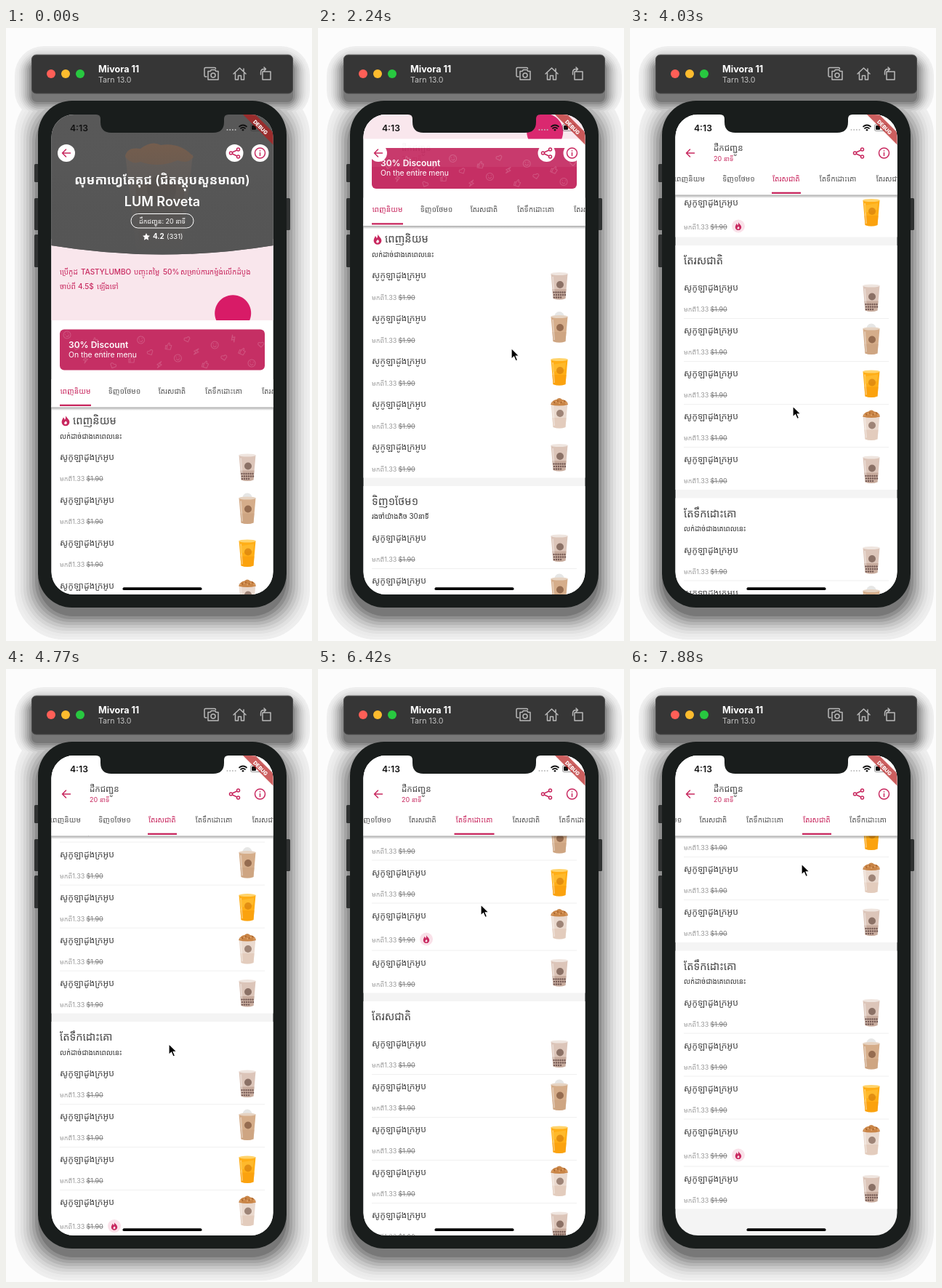
Write an HTML page that moves like this. It is 421x843 px and loops after 8 s.

```html
<!DOCTYPE html>
<html lang="km">
<head>
<meta charset="utf-8">
<title>Menu scroll</title>
<style>
html,body{margin:0;width:100%;height:100%;overflow:hidden;background:#fcfcfc}
svg{display:block;width:100%;height:100%}
text{font-family:Inter,"Noto Sans Khmer","Noto Sans",sans-serif}
.line{fill:none;stroke-linecap:round;stroke-linejoin:round}
</style>
</head>
<body>
<svg id="stage" viewBox="0 0 421 843"></svg>
<script>
const PINK = '#c8285f', LEFT = 74, BAR = 292, LOOP = 8000;
const stage = document.getElementById('stage');
const $ = id => document.getElementById(id);
const clamp = (v, a, b) => Math.max(a, Math.min(b, v));
const lerp = (a, b, k) => a + (b - a) * k;

const text = (x, y, size, fill, str, extra = '') =>
  `<text x="${x}" y="${y}" font-size="${size}" fill="${fill}" ${extra}>${str}</text>`;
const rect = (x, y, w, h, fill, r = 0, extra = '') =>
  `<rect x="${x}" y="${y}" width="${w}" height="${h}" rx="${r}" fill="${fill}" ${extra}/>`;
const circle = (x, y, r, fill, extra = '') =>
  `<circle cx="${x}" cy="${y}" r="${r}" fill="${fill}" ${extra}/>`;
const path = (d, fill, extra = '') => `<path d="${d}" fill="${fill}" ${extra}/>`;
const line = (d, stroke, w, extra = '') =>
  `<path class="line" d="${d}" stroke="${stroke}" stroke-width="${w}" ${extra}/>`;
const at = (x, y, body, scale = 1) => `<g transform="translate(${x} ${y}) scale(${scale})">${body}</g>`;

const POPULAR = 'ពេញនិយម', DEAL = 'ទិញ១ថែម១', FRESH = 'តែរសជាតិ', MILK = 'តែទឹកដោះគោ';
const BEST = 'លក់ដាច់ជាងគេពេលនេះ';
const tabs = [
  { name: POPULAR, x: 74, w: 43 }, { name: DEAL, x: 141, w: 44 },
  { name: FRESH, x: 208.5, w: 40 }, { name: MILK, x: 272, w: 55 },
  { name: FRESH, x: 351, w: 40 }, { name: MILK, x: 414, w: 55 }
];
const sections = [
  { sub: BEST, n: 5 }, { sub: 'រងចាំយ៉ាងតិច 30នាទី', n: 3, hot: 2 }, { n: 5 },
  { sub: BEST, n: 5, hot: 3 }, { n: 5 }, { sub: BEST, n: 5, hot: 3 }
];

const flame = (hole = '#fff') =>
  path('M0-7C1-4 5.4-2 5.4 2A5.4 5.2 0 0 1-5.4 2C-5.4-1-3.5-2.4-3.2-4.4C-2-3.5-1.4-2-1.2-1C0-2.5.4-5 0-7Z', PINK) +
  path('M.4.5C2.6 2.4 2.2 5-.2 5S-2.4 2.2.4.5Z', hole);

// Drink cups, centred on x, y = 0 at the middle of the cup
const cupStyles = [
  { body: '#dcc5b9', foot: '#b79787', rim: '#efe5df', mark: '#70564b' },
  { body: '#d5ad8a', foot: '#c89f7d', rim: '#e6d3c2', mark: '#80573c' },
  { body: '#ffae16', foot: '#f79a08', rim: '#ffd36b', mark: '#d9820c' },
  { body: '#ead9ce', foot: '#dfc3b0', rim: '#e9d8c9', mark: '#85695a' }
];
function cup(kind) {
  const c = cupStyles[kind];
  let s = '';
  if (kind === 1) s += path('M-7-15A7 8 0 0 1 7-15Z', '#e6e6e5');
  s += path('M-11.5-16H11.5L8.5 18Q0 21-8.5 18Z', c.body) +
    path('M-9.6 5H9.6L8.5 18Q0 21-8.5 18Z', c.foot, 'opacity=".55"') +
    path('M-9-12L-7 16', 'none', 'stroke="#fff" stroke-opacity=".35" stroke-width="2"') +
    `<ellipse cy="-16" rx="11.8" ry="2" fill="${c.rim}"/>`;
  if (kind === 0)
    for (let i = 0; i < 16; i++)
      s += circle(-7.5 + (i % 6) * 3 + (i > 5 ? .5 : 0), 9.5 + Math.floor(i / 6) * 3.5, 1.2, '#765b55');
  if (kind === 2) s += path('M-10-9L9-12L8-3L-9 1Z', '#ffc23a', 'opacity=".6"');
  if (kind === 3) {
    s += path('M-12-13Q-9-20-4-20Q0-24 4-20Q10-20 12-13Q0-10-12-13Z', '#c98547');
    for (let i = 0; i < 9; i++) s += circle(-9 + i * 2.3, -15 - (i * 5 % 4), 1, i % 2 ? '#a8622c' : '#e2a76c');
  }
  return s + circle(1, -1, 5, c.mark, 'opacity=".75"');
}

function item(y, kind, hot, ruled) {
  const py = y + (hot ? 37 : 33.3);
  return text(LEFT, y + 4, 12.2, '#444', 'សូកូឡាដូងក្រអូប') +
    text(LEFT, py, 9, '#999', 'មកពី1.33') +
    text(110.5, py, 9, '#777', '$1.90', 'text-decoration="line-through"') +
    (hot ? circle(149, y + 33, 9, '#f9e1e9') + at(149, y + 33, flame('#f9e1e9'), .78) : '') +
    at(332, y + 13.5, cup(kind)) +
    (ruled ? rect(LEFT, y + (hot ? 48 : 42), 282, 1, '#f0f0f0') : '');
}

function buildSections() {
  let y = 519, out = '';
  sections.forEach((sec, i) => {
    sec.top = y;
    let iy = y + (sec.sub ? 71 : 58), body = '';
    for (let k = 0; k < sec.n; k++) {
      const hot = k === sec.hot;
      body += item(iy, k % 4, hot, i > 0 && k < sec.n - 1);
      iy += hot ? 65 : 59;
    }
    sec.end = iy - 17;
    out += rect(62, y, 306, sec.end - y, '#fff') +
      (i ? '' : at(82, y + 21, flame())) +
      text(i ? LEFT : 92, y + 26, 14.6, '#444', tabs[i].name) +
      (sec.sub ? text(LEFT, y + 45.5, 9.8, '#333', sec.sub) : '') + body;
    y = sec.end + 11.5;
  });
  return out;
}

function doodles() {
  const kinds = [
    '<circle r="5"/><path d="M-2 1Q0 4 2 1M-2-2v.5M2-2v.5"/>',
    '<path d="M0 4L-4 0Q-4-4 0-2Q4-4 4 0Z"/>',
    '<path d="M1-5L-3 1H0L-1 5L3-1H0Z"/>',
    '<path d="M-4 0h2v5h-2zM-2 0L0-4Q2-4 1-1H4L3 5H-2"/>'
  ];
  let s = '';
  for (let i = 0; i < 22; i++) {
    const x = 84 + (i * 12.7) % 268, y = 422 + (i * 17) % 43;
    s += `<g transform="translate(${x} ${y}) rotate(${i * 47 % 60 - 30})">${kinds[i % 4]}</g>`;
  }
  return `<g class="line" stroke="#fff" stroke-width="1.1" opacity=".17">${s}</g>`;
}

function hero() {
  const mid = 'text-anchor="middle" font-weight="600"';
  return rect(62, 290, 306, 232, '#fff') + rect(62, 290, 306, 112, '#f9e6ec') +
    `<g clip-path="url(#hero)">` + rect(62, 60, 306, 260, '#585858') +
    path('M164 174H257L243 304H179Z', '#77685e', 'opacity=".65"') +
    path('M178 215H246L240 304H184Z', '#604d40', 'opacity=".6"') +
    path('M164 177Q166 163 185 166Q200 154 213 161Q240 157 258 177Q251 188 236 182Q210 193 185 184Q173 189 164 177Z', '#80604a') +
    circle(214, 222, 20, '#493e38', 'opacity=".55"') +
    rect(62, 119, 306, 195, 'url(#dim)') + '</g>' +
    text(215, 214.5, 17, '#fff', 'លុមកាហ្វេតែគុជ (ជិតស្តុបសួនមាលា)', mid) +
    text(215, 244.5, 18, '#fff', 'LUM Roveta', mid) +
    rect(172, 255.5, 86, 19.5, 'none', 9.7, 'stroke="#fff"') +
    text(215, 268.5, 9, '#fff', 'ដឹកជញ្ជូន: 20 នាទី', 'text-anchor="middle"') +
    path('M193 282l1.5 3.3 3.5.4-2.6 2.4.7 3.6-3.1-1.8-3.1 1.8.7-3.6-2.6-2.4 3.5-.4Z', '#fff') +
    text(202, 290.3, 9.8, '#fff', '4.2', 'font-weight="700"') + text(221, 290.3, 9.5, '#fff', '(331)') +
    `<g font-weight="500">` +
    [[74, 'ប្រើកូដ'], [103, 'TASTYLUMBO'], [176, 'បញ្ចុះតម្លៃ'], [216, '50%'], [240, 'សម្រាប់ការកម្ម៉ង់លើកដំបូង']]
      .map(([x, s]) => text(x, 338.5, 10, PINK, s)).join('') +
    [[74, 'ចាប់ពី'], [99, '4.5$'], [125, 'ឡើងទៅ']].map(([x, s]) => text(x, 359, 10, PINK, s)).join('') + '</g>' +
    path('M289.2 402A25 25 0 1 1 335.2 402Z', '#d81b67') +
    rect(74, 414.5, 282, 56, '#c52f64', 6) + doodles() +
    text(86, 440, 12, '#fff', '30% Discount', 'font-weight="600"') +
    text(86, 453, 10.4, '#fff', 'On the entire menu');
}

function shadow() {
  let s = '';
  for (let i = 0; i < 9; i++) {
    const k = i / 8, d = 32 * (1 - k), g = Math.round(238 - 118 * k ** 1.6), fill = `rgb(${g},${g},${g})`;
    s += rect(35 - d * .72, 49 - d * .75, 360 + d * 1.44, 53 + d * 1.5, fill, 8 + d) +
      rect(44 - d, 112 - d, 342 + 2 * d, 697 + 2 * d, fill, 48 + d * .6);
  }
  return s;
}

function device() {
  const icon = d => line(d, '#b9b9b9', 1.5);
  return rect(35.5, 37, 359, 53, '#363636', 6, 'stroke="#4c4c4c"') +
    ['#ff5f57', '#febc2e', '#28c840'].map((c, i) => circle(62 + i * 20, 63, 6, c)).join('') +
    text(127, 60.5, 12.6, '#fff', 'Mivora 11', 'font-weight="700"') +
    text(127, 75, 10.6, '#c4c4c4', 'Tarn 13.0') +
    icon('M276 67H274.500Q273 67 273 65.500V56Q273 54.500 274.500 54.500H287Q288.500 54.500 288.500 56M278 59.500H281L282.500 57.500H287.500L289 59.500H292V71H278Z') +
    `<circle cx="285" cy="65" r="3" class="line" stroke="#b9b9b9" stroke-width="1.5"/>` +
    icon('M313 63L321.500 55L330 63M315.500 62V71H319.500V65.500H323.500V71H327.500V62M327 59V56') +
    icon('M353 60H364V71H353ZM350.500 64V61Q350.500 56.500 355 56.500H357M355 54L357.500 56.500L355 59') +
    [[39, 187, 25], [39, 234, 44], [39, 284, 45], [385, 234, 44]].map(([x, y, h]) => rect(x, y, 6, h, '#303232', 1.5)).join('') +
    rect(44, 100, 342, 697, '#191d1c', 47);
}

function pinned() {
  const share = circle(5, -5, 2, 'none') + circle(-5, 0, 2, 'none') + circle(5, 5, 2, 'none') + '<path d="M-3.200-1L3.200-4M-3.200 1L3.200 4"/>';
  const info = circle(0, 0, 7, 'none') + '<path d="M0-3.300v.2M0-.4v3.800"/>';
  const back = '<path d="M5.500 0H-5.500M-.5-5L-5.500 0L-.5 5"/>';
  const button = (x, d) => circle(x, 172, 12, '#fff') +
    at(x, 172, `<g class="line" stroke="${PINK}" stroke-width="1.5">${d}</g>`);
  return `<g id="bar">${rect(62, 119, 306, 72, '#fff')}` +
    text(115, 169, 11.6, '#444', 'ដឹកជញ្ជូន') + text(115, 183, 9, PINK, '20 នាទី') + '</g>' +
    `<g id="tabBar">${rect(62, 521, 306, 5, 'url(#under)')}${rect(62, 483, 306, 38.5, '#fff')}<g id="tabRow">` +
    tabs.map((t, i) => text(t.x + t.w / 2, 502.5, 10.2, '#555', t.name, `id="tab${i}" text-anchor="middle"`)).join('') +
    `<rect id="mark" y="517.700" height="2.300" fill="${PINK}"/></g></g>` +
    button(83, back) + button(314.5, share) + button(349.5, info) +
    text(88, 141.5, 12.2, '#111', '4:13', 'font-weight="600"') +
    [0, 1, 2, 3].map(i => circle(304.5 + i * 3.7, 140, 1, '#bbb')).join('') +
    line('M321 135.500Q326 131.500 331 135.500M323 138Q326 135.800 329 138', '#111', 1.7) + circle(326, 140.2, 1.3, '#111') +
    rect(336.5, 132.5, 17, 9, 'none', 2, 'stroke="#333" stroke-opacity=".5"') + rect(338, 134, 6, 6, '#111', 1) +
    path('M124 119Q130 119 130 125V129Q130 144 145 144H285Q300 144 300 129V125Q300 119 306 119Z', '#191d1c') +
    path('M326 119H343L368 144V161Z', '#b71c1c', 'opacity=".7"') +
    `<g transform="translate(350 136.500) rotate(45)">${text(0, 2.5, 7.2, '#fff', 'DEBUG', 'text-anchor="middle" font-weight="800"')}</g>` +
    rect(160.5, 769.3, 109, 3.8, '#000', 1.9);
}

stage.innerHTML =
  `<defs><clipPath id="screen">${rect(62.5, 119, 305, 660, '#000', 31)}</clipPath>
  <clipPath id="hero"><path d="M62 60H368V299Q215 324 62 299Z"/></clipPath>
  <linearGradient id="dim" x2="0" y2="1"><stop stop-color="#585858" stop-opacity=".05"/><stop offset=".65" stop-color="#555" stop-opacity=".8"/><stop offset="1" stop-color="#555"/></linearGradient>
  <linearGradient id="under" x2="0" y2="1"><stop stop-color="#000" stop-opacity=".38"/><stop offset="1" stop-color="#000" stop-opacity="0"/></linearGradient></defs>` +
  rect(0, 0, 421, 843, '#fcfcfc') + shadow() + device() +
  `<g clip-path="url(#screen)">${rect(62, 119, 306, 660, '#f4f4f4')}<g id="page">${buildSections()}${hero()}</g>${pinned()}</g>` +
  `<g id="cursor">${path('M0 0V15L3.500 11.800L6 17.500L8.600 16.400L6.200 10.900H11Z', '#000', 'stroke="#fff" stroke-width="1.200"')}</g>`;

// time, scroll, pointer x, pointer y
const keys = [
  [900, 0, 330, 690], [1340, 0, 282, 630], [1790, 74, 275, 555], [2240, 250, 266, 440],
  [2600, 385, 244, 480], [2980, 466, 240, 488], [3500, 620, 230, 450], [4030, 829, 224, 520],
  [4700, 1010, 224, 515], [5520, 1233, 224, 455], [6420, 1385, 224, 324],
  [7100, 1640, 230, 250], [7600, 1785, 235, 262], [7870, 1802, 236, 268]
];
function pose(t) {
  const i = keys.findIndex(k => k[0] > t);
  if (i === 0) return keys[0];
  if (i < 0) return keys[keys.length - 1];
  const a = keys[i - 1], b = keys[i], k = (t - a[0]) / (b[0] - a[0]);
  return a.map((v, n) => lerp(v, b[n], k));
}

// The screen refreshes in steps of about 150 ms
const beats = [[900, 8], [2090, 8], [3280, 7], [4330, 8], [5520, 7], [6570, 8], [7740, 2], [LOOP, 1]];
function snap(t) {
  if (t < 900) return 0;
  const i = beats.findIndex(b => b[0] > t) - 1;
  const [start, n] = beats[i], step = (beats[i + 1][0] - start) / n;
  return start + Math.floor((t - start + 4) / step) * step;
}

// The active tab is the middle one of all visible sections
function activeTab(t) {
  const s = pose(t)[1];
  const seen = sections.map((_, i) => i).filter(i => sections[i].top - s < 779 && sections[i].end - s > 228);
  return Math.floor(seen.reduce((a, b) => a + b, 0) / seen.length);
}
function tabPosition(t) {
  let sum = 0;
  for (let i = 0; i < 10; i++) sum += activeTab(t - i * 25);
  return sum / 10;
}
const tabScroll = t => clamp(t.x + t.w / 2 - 215, 0, 114);

function draw(time) {
  const t = snap(time), [, s, cx, cy] = pose(t);
  $('page').setAttribute('transform', `translate(0 ${-s})`);
  $('tabBar').setAttribute('transform', `translate(0 ${-Math.min(s, BAR)})`);
  $('bar').setAttribute('opacity', clamp((s - 247) / 45, 0, 1));
  const p = tabPosition(t), a = tabs[Math.floor(p)], b = tabs[Math.ceil(p)], k = p % 1;
  $('tabRow').setAttribute('transform', `translate(${-lerp(tabScroll(a), tabScroll(b), k)} 0)`);
  $('mark').setAttribute('x', lerp(a.x, b.x, k));
  $('mark').setAttribute('width', lerp(a.w, b.w, k));
  tabs.forEach((_, i) => $('tab' + i).setAttribute('fill', i === Math.round(p) ? PINK : '#555'));
  $('cursor').setAttribute('transform', `translate(${cx} ${cy})`);
  $('cursor').setAttribute('visibility', t < 900 ? 'hidden' : 'visible');
}

const began = performance.now();
function tick() {
  draw((performance.now() - began) % LOOP);
  requestAnimationFrame(tick);
}
tick();
</script>
</body>
</html>
```
